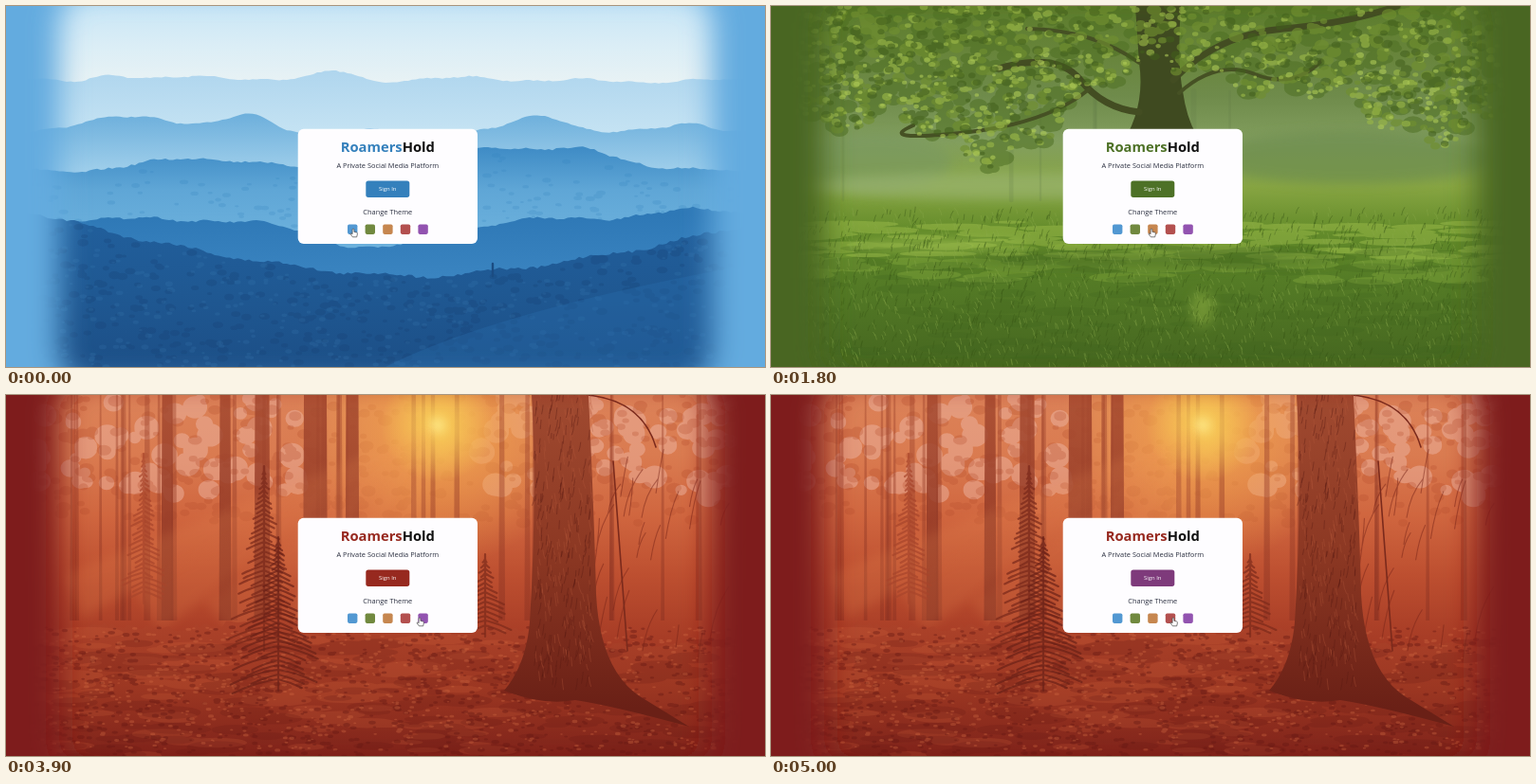
An HTML page for the animation above (5.1 s loop, 800x381 px).

```html
<!DOCTYPE html>
<html lang="en">
<head>
<meta charset="utf-8">
<title>RoamersHold</title>
<style>
  html, body { margin: 0; width: 100%; height: 100%; overflow: hidden; }
  svg { display: block; width: 100%; height: 100%; }
  text { font-family: "Open Sans", "Noto Sans", sans-serif; text-anchor: middle; }
</style>
</head>
<body>
<svg id="stage" viewBox="0 0 800 381">
  <defs id="defs">
    <filter id="soft" x="-20%" y="-20%" width="140%" height="140%"><feGaussianBlur stdDeviation="15"/></filter>
    <filter id="haze" x="-50%" y="-100%" width="200%" height="300%"><feGaussianBlur stdDeviation="6"/></filter>
  </defs>
  <g id="scenes"></g>
  <rect x="307.7" y="129.7" width="189.3" height="121.3" rx="6" fill="#fefdff"/>
  <text x="402.3" y="153.8" font-size="14.75" font-weight="700" fill="#111"><tspan id="brand">Roamers</tspan>Hold</text>
  <text x="402.3" y="171" font-size="7.43" fill="#2b3040">A Private Social Media Platform</text>
  <rect id="button" x="379.3" y="184.5" width="46" height="17.4" rx="2.6"/>
  <text x="402.3" y="195.3" font-size="5.9" fill="#fff">Sign In</text>
  <text x="402.3" y="220.2" font-size="7.43" fill="#2b3040">Change Theme</text>
  <g id="swatches"></g>
  <g id="cursor" stroke="#444" stroke-width=".7" stroke-linejoin="round" fill="#fff">
    <path id="hand" d="M-.9 .6Q0 -.6 .9 .6V3.3L3.6 4Q4.6 4.3 4.4 5.6L3.7 8.8H-.6L-2.8 5.9Q-3 4.8-2 4.9L-.9 5.7Z"/>
    <path id="arrow" d="M0 0V8.6L2 6.9L3.4 10L4.9 9.3L3.6 6.3H6.2Z"/>
  </g>
</svg>
<script>
const LOOP = 5100, STEP = 100, FADE = 300;
const $ = id => document.getElementById(id);

const themes = [
  { draw: hills, swatch: '#5298d2', main: '#3480bc', edge: '#64abdf' },
  { draw: tree, swatch: '#71893f', main: '#4d7126', edge: '#4a6622' },
  { draw: desert, swatch: '#c6864f', main: '#b2693c', edge: '#a4623d' },
  { draw: forest, swatch: '#b3504f', main: '#97291f', edge: '#7e1c1b' },
  { draw: lake, swatch: '#9253b0', main: '#76409a', edge: '#5f2b79' }
];

// Each visit: pointer leaves, arrives, at x, then picks a theme
const visits = [
  { from: 200, to: 700, x: 385.5, pick: 960, theme: 1 },
  { from: 1300, to: 1700, x: 401, pick: 1960, theme: 2 },
  { from: 2400, to: 2800, x: 421, pick: 3160, theme: 3 },
  { from: 3600, to: 3800, x: 436, pick: 3960, theme: 4 },
  { from: 4400, to: 4800, x: 424, pick: 4960, theme: 3 }
];

let seed = 7;
const rnd = (a = 0, b = 1) => {
  seed = (seed * 16807) % 2147483647;
  return a + (b - a) * seed / 2147483647;
};
const n1 = v => v.toFixed(1);
const clamp = v => Math.max(0, Math.min(1, v));
const many = (n, make) => Array.from({ length: n }, (_, i) => make(i)).join('');

// Ground line: a level with bell-shaped hills [x, height, width] and a gentle wave
const land = (level, ...bells) => x => level + 2 * Math.sin(x / 23 + level) + Math.sin(x / 9) -
  bells.reduce((sum, [c, h, w]) => sum + h * Math.exp(-(((x - c) / w) ** 2)), 0);

const path = (d, fill, more = '') => `<path d="${d}" fill="${fill}" ${more}/>`;
const line = (d, color, w, op = 1) =>
  `<path d="${d}" fill="none" stroke="${color}" stroke-width="${w}" stroke-linecap="round" opacity="${op}"/>`;
const box = (y, h, fill) => `<rect y="${y}" width="800" height="${h}" fill="${fill}"/>`;
const glow = (x, y, rx, ry, fill, op = .6) =>
  `<ellipse cx="${x}" cy="${y}" rx="${rx}" ry="${ry}" fill="${fill}" opacity="${op}" filter="url(#haze)"/>`;

let ids = 0;
function define(tag, attrs, stops) {
  const id = 'g' + ids++;
  $('defs').insertAdjacentHTML('beforeend',
    `<${tag} id="${id}" gradientUnits="userSpaceOnUse" ${attrs}>${stops}</${tag}>`);
  return `url(#${id})`;
}
const grad = (y0, y1, ...colors) => define('linearGradient', `x1="0" x2="0" y1="${y0}" y2="${y1}"`,
  colors.map((c, i) => `<stop offset="${i / (colors.length - 1)}" stop-color="${c}"/>`).join(''));
const radial = (x, y, r, color) => `<circle cx="${x}" cy="${y}" r="${r}" fill="${
  define('radialGradient', `cx="${x}" cy="${y}" r="${r}"`,
    `<stop offset="0" stop-color="${color}"/><stop offset="1" stop-color="${color}" stop-opacity="0"/>`)}"/>`;

function ridge(top, fill, rough = 1, x0 = 0, x1 = 800) {
  let d = `M${x0} 381`;
  for (let x = x0; x <= x1; x += 4) d += `L${x} ${n1(top(x) + rnd(-rough, rough))}`;
  return path(d + 'V381Z', fill);
}

// Many small ovals in one path, kept where ok(x, y) holds
const dots = (n, y0, y1, r, flat, fill, op, ok = () => true) => path(many(n, () => {
  const x = rnd(25, 775), y = rnd(y0, y1), a = r * rnd(.4, 1), b = a * flat;
  return ok(x, y) ? `M${n1(x - a)} ${n1(y)}a${n1(a)} ${n1(b)} 0 1 0 ${n1(2 * a)} 0a${n1(a)} ${n1(b)} 0 1 0 ${n1(-2 * a)} 0` : '';
}), fill, `opacity="${op}"`);

// Many short bent strokes leaning by (dx, dy)
const blades = (n, y0, y1, dx, dy, color, w, op, ok = () => true) => line('M0 0' + many(n, () => {
  const x = rnd(25, 775), y = rnd(y0, y1), k = rnd(.4, 1);
  return ok(x, y) ? `M${n1(x)} ${n1(y)}q${n1(dx * k * .2)} ${n1(dy * k * .6)} ${n1(dx * k * rnd(.2, 1))} ${n1(dy * k)}` : '';
}), color, w, op);

function hills() {
  const mid = land(174, [210, 14, 80], [510, 25, 55], [610, 22, 60]);
  const front = x => 285 - 75 * (Math.abs(x - 430) / 430) ** 1.6 + 2 * Math.sin(x / 17);
  const low = (x, y) => y > front(x) + 4;
  return box(0, 381, grad(0, 90, '#c9e6f6', '#dceef6', '#ebf3f4')) +
    ridge(land(79, [350, 11, 28], [110, 8, 25], [220, 5, 50], [500, 4, 40]), grad(70, 135, '#b0d6ee', '#c5e3f3'), .6) +
    ridge(land(132, [140, 15, 75], [255, 15, 32], [565, 15, 40], [725, 8, 30]), grad(115, 172, '#6eb0dc', '#9dcdea'), .6) +
    ridge(mid, grad(148, 240, '#3e8bc5', '#5fa6d6', '#6bb0dc')) +
    dots(250, 155, 240, 5, .5, '#2f7dba', .2, (x, y) => y > mid(x) + 6) +
    ridge(land(225, [390, -30, 90], [740, 10, 80]), grad(220, 285, '#2e78b6', '#3a84c0')) +
    ridge(front, grad(225, 381, '#215f9c', '#1f5892', '#1c4f87'), 1.5) +
    dots(650, 215, 381, 6, .6, '#173f70', .25, low) + dots(500, 215, 381, 4, .6, '#3c7fb5', .18, low) +
    path('M400 381Q520 320 800 270V381Z', '#2a6dac', 'opacity=".35"') + line('M513 285V272', '#1b4c82', 2.4);
}

function tree() {
  const rim = land(62, [235, -108, 95], [700, -85, 100], [60, -65, 80], [520, -30, 60]);
  const leaf = (x, y) => y < rim(x) + 10 * Math.sin(x / 11) - 4;
  const crown = (n, r, color, op, y0 = 0) => dots(n, y0, 185, r, .7, color, op, leaf);
  let s = box(0, 381, grad(0, 381, '#5c7c2c', '#67843a', '#6f8b4b', '#829e5e', '#87a542', '#638b2a', '#557c26', '#4d7123', '#45661f'));
  s += glow(610, 160, 150, 28, '#6b8a4d') + glow(110, 165, 80, 30, '#799860') + glow(250, 190, 220, 14, '#9bb576');
  s += many(9, () => line(`M${n1(rnd(60, 750))} 205V90`, '#5e7a45', rnd(2, 6), .2));
  s += crown(650, 13, '#4f7023', .55);
  s += path('M376 135Q394 100 388 60L384 0H432Q428 60 434 90Q438 118 448 135Z', '#3f4a20');
  s += line('M388 112Q350 108 326 78T240 66M424 78Q470 30 540 24T660 0', '#434d22', 7) +
    line('M335 88Q290 125 200 134T150 126M430 92Q470 56 510 72T580 58M388 60Q340 25 270 24', '#465124', 4);
  s += crown(650, 8, '#718f30', .65) + crown(650, 5, '#98b648', .65) + crown(400, 4, '#b0cb58', .6, 50) + crown(550, 6, '#42601c', .55);
  // Sunlit streaks above, tree shade below
  s += dots(110, 228, 265, 42, .09, '#a8c650', .4) + dots(70, 252, 290, 38, .14, '#9cbf48', .28) +
    dots(120, 250, 381, 40, .13, '#3c601b', .22);
  s += glow(180, 252, 95, 6, '#a9c852', .6) + glow(455, 320, 12, 18, '#94b544', .5) + glow(400, 268, 200, 9, '#476b20', .5);
  return s + blades(1500, 218, 388, 4, -8, '#3a5a18', .9, .5) + blades(1200, 218, 388, -4, -7, '#8cab4c', .8, .45);
}

function desert() {
  let s = box(0, 381, grad(0, 110, '#cfa848', '#deb052', '#d08a45')) + radial(408, 40, 300, '#f4ec72') +
    radial(408, 60, 70, '#fff8a8') + glow(408, 62, 16, 8, '#fffbd0', .9) +
    '<ellipse cx="408" cy="62" rx="10" ry="5.5" fill="#fffff4"/>' +
    line('M375 50H432M384 40H422M395 46H440', '#fff3a0', 1.2, .7);
  s += ridge(land(79, [160, 5, 60], [580, 6, 100], [0, -15, 70], [800, -10, 70]), grad(72, 135, '#d08a44', '#d58a45', '#b9643a'), .6);
  s += box(106, 34, grad(106, 140, '#c77a40', '#b2623a', '#a8603a'));
  s += dots(250, 128, 141, 6, .45, '#7e4a30', .6) + dots(160, 112, 128, 9, .2, '#974f34', .35);
  s += box(139, 242, grad(139, 381, '#c98846', '#d29c48', '#cf9a46', '#c79040', '#bd853c'));
  // Dune crests grow larger towards the viewer
  for (let y = 148; y < 385; y += 3 + (y - 140) * .045) {
    const size = 1 + (y - 140) / 45;
    let lit = '', dark = '';
    for (let x = rnd(-80, 0); x < 800;) {
      const w = rnd(22, 42) * (1 + size * .3), h = rnd(1.2, 2.8) * size, v = y + rnd(-2, 2) * size;
      lit += `M${n1(x)} ${n1(v)}q${n1(w * .35)} ${n1(-h * 1.4)} ${n1(w)} ${n1(h * .3)}q${n1(-w * .5)} ${n1(h * .5)} ${n1(-w)} ${n1(-h * .3)}`;
      dark += `M${n1(x + w * .3)} ${n1(v - h * .5)}q${n1(w * .5)} 0 ${n1(w)} ${n1(h * 1.7)}q${n1(-w * .6)} ${n1(h * .3)} ${n1(-w)} ${n1(-h * 1.7)}`;
      x += w * rnd(.8, 1.3);
    }
    s += path(dark, '#a86e2c', 'opacity=".45"') + path(lit, '#e5bb66', 'opacity=".6"');
  }
  return s + dots(55, 230, 370, 4, .5, '#96672f', .65);
}

function fir(x, top, base, w, color) {
  let d = `M${x} ${top}V${base}`;
  for (let y = top + 8; y < base - 8; y += 5) {
    const r = w * (y - top) / (base - top), a = r * rnd(.4, 1), b = r * rnd(.4, 1);
    d += `M${n1(x - a)} ${n1(y + a * .25)}Q${n1(x - a / 2)} ${y} ${x} ${y - 3}Q${n1(x + b / 2)} ${y} ${n1(x + b)} ${n1(y + b * .25)}`;
  }
  return line(d, color, 2.2, .7);
}

function forest() {
  const post = (x, w, op) => path(`M${n1(x - w / 2)} 0h${n1(w)}l1 238h${n1(-w - 2)}Z`, grad(0, 238, '#a5492f', '#872f20'), `opacity="${op}"`);
  let s = box(0, 381, grad(0, 381, '#dc8258', '#da7b50', '#d0663f', '#bd4f30', '#a83d26', '#97301f', '#81241a'));
  s += dots(170, 0, 110, 14, .9, '#eeb3a2', .5, x => x < 310 || x > 500) + dots(420, 0, 135, 8, .7, '#b54c2e', .28);
  s += radial(455, 32, 150, '#f2a44c');
  s += many(32, () => post(rnd(60, 760), rnd(1.5, 5), .45));
  s += [[170, 11], [231, 11], [270, 15], [326, 24], [365, 13]].map(([x, w]) => post(x, w, .85)).join('');
  s += radial(455, 32, 60, '#f8cf58') + glow(455, 32, 7, 7, '#fff0a0', .8);
  // Sunbeams
  s += many(5, i => path(`M452 34L${60 + i * 75} ${190 + i * 14}l${20 + i * 8} 45Z`, '#f39a5c', 'opacity=".16" filter="url(#haze)"'));
  s += ridge(land(245, [360, 12, 110], [680, -20, 120]), grad(235, 381, '#ad432a', '#9c3722', '#7f231a'), 3);
  s += dots(130, 245, 381, 38, .16, '#d0643e', .2, x => x < 530) + dots(170, 260, 381, 34, .2, '#641812', .22);
  s += dots(900, 245, 385, 4, .5, '#641812', .4) + dots(800, 245, 375, 3, .5, '#d06a43', .35);
  s += fir(145, 62, 220, 28, '#a8452c') + fir(272, 75, 270, 44, '#79291b') + fir(287, 150, 312, 62, '#6b2117') +
    fir(505, 168, 255, 38, '#7d2a1b');
  s += blades(110, 60, 290, 24, -55, '#792419', 1.1, .5, x => x > 615) + line('M612 0Q670 5 685 55M655 270L640 70', '#7b2a1c', 1.6);
  s += path('M554 0H614Q620 130 622 210Q626 290 668 318L720 350Q640 328 600 322Q565 328 525 312Q548 285 552 240Q560 110 554 0Z',
    grad(0, 330, '#a04a30', '#8c3823', '#6a2016'));
  const bark = x => x > 557 && x < 617;
  return s + blades(2400, -10, 300, 4, 14, '#b2583a', 1, .35, bark) + blades(2400, -10, 300, -3, 12, '#571a12', 1, .4, bark);
}

function lake() {
  const left = x => 142 + 8 * Math.sin(x / 30) + 125 * clamp((x - 290) / 145) ** 1.3;
  const right = x => 262 - 215 * clamp((x - 495) / 300) ** .6;
  const inL = (x, y) => x < 435 && y > left(x) && x < 440 - (y - 265) * .5;
  const inR = (x, y) => x > 495 && y > right(x) && x > 495 + (y - 265) * .25;
  const field = (x, y) => inL(x, y) || inR(x, y);
  const peaks = land(101, [215, 41, 55], [503, 32, 42], [575, 12, 45]);
  let s = box(0, 110, grad(0, 110, '#9c66b6', '#b480c8', '#c890ca', '#d69ab4')) + glow(600, 88, 120, 12, '#e9a45c', .8) +
    glow(390, 94, 100, 8, '#eba35a', .8) + glow(650, 50, 110, 9, '#d883a4') + glow(690, 22, 90, 14, '#7f4aa0', .5) +
    glow(130, 45, 90, 20, '#bf92d4') + line('M330 20Q470 38 640 10M420 48Q560 45 720 30', '#8e5aac', 2.5, .4);
  s += ridge(peaks, grad(58, 110, '#5b2c66', '#623279', '#54286e'), .4, 40, 672);
  s += path('M625 110Q680 92 740 74L800 64V112Z', '#4d2358');
  s += box(108, 120, grad(108, 228, '#9468b4', '#b791cf', '#a583c4', '#9a78bc')) + glow(570, 126, 90, 9, '#dc9a80', .8) +
    glow(540, 158, 60, 18, '#e0a67a') + glow(520, 195, 30, 15, '#d0a0a8', .5);
  s += blades(130, 110, 165, 24, 0, '#8657a6', .8, .4) + path('M40 110L80 112L60 119H0V110Z', '#4f2560');
  s += box(226, 155, '#552772');
  s += path('M436 266H497L502 300L528 381H375Q400 345 418 315Z', grad(262, 381, '#9b7bb0', '#9a79ae', '#85609d'));
  const trail = (x, y) => x > 400 && x < 520;
  s += dots(500, 270, 381, 9, .4, '#6b4587', .35, trail) + dots(300, 270, 381, 7, .4, '#bfa3cc', .4, trail) +
    line('M434 307V315M436 322V327', '#50255f', 3);
  const fill = grad(100, 381, '#793f92', '#713a8c', '#5c2a77', '#4f2269');
  s += ridge(left, fill, 4, 0, 380) + path('M378 381V205L436 268Q425 320 380 381Z', fill) +
    ridge(right, fill, 4, 528, 800) + path('M530 381L496 262L530 200Z', fill);
  s += dots(800, 60, 381, 6, .7, '#441a5c', .45, field) + dots(600, 60, 381, 4, .7, '#9a5bb0', .45, field);
  s += blades(600, 110, 381, 13, -26, '#a866be', 2, .55, inL) + blades(800, 70, 381, -15, -25, '#ac6cc0', 2, .55, inR);
  s += blades(260, 60, 381, 8, -15, '#c38ad0', 1.1, .5, field);
  return s + glow(290, 330, 55, 32, '#421a5c') + glow(520, 345, 14, 40, '#4a1f64', .4);
}

const frame = c => path('M-90 -90H890V471H-90ZM96 -18Q56 -18 56 22V359Q56 399 96 399H704Q744 399 744 359V22Q744 -18 704 -18Z',
  c, 'fill-rule="evenodd" filter="url(#soft)"');

$('scenes').innerHTML = themes.map(t => `<g>${t.draw()}${frame(t.edge)}</g>`).join('');
const scenes = [...$('scenes').children];

const SIZE = 10.4;
const swatchX = i => 360 + i * 18.6;
$('swatches').innerHTML = themes.map((t, i) =>
  `<rect x="${swatchX(i)}" y="230.5" width="${SIZE}" height="${SIZE}" rx="1.8" fill="${t.swatch}"/>`).join('');

const ease = k => 1 - (1 - clamp(k)) ** 2;
function mix(a, b, k) {
  const part = (c, i) => parseInt(c.slice(i, i + 2), 16);
  return `rgb(${[1, 3, 5].map(i => Math.round(part(a, i) + (part(b, i) - part(a, i)) * k))})`;
}

let shown = -1;
function render(ms) {
  const t = Math.floor((ms % LOOP) / STEP) * STEP;
  if (t === shown) return;
  shown = t;

  let x = 366, now = 0, color = themes[0].main;
  for (const v of visits) {
    x += (v.x - x) * ease((t - v.from) / (v.to - v.from));
    if (t < v.pick) continue;
    color = mix(themes[now].main, themes[v.theme].main, ease((t - v.pick) / FADE));
    now = v.theme;
  }
  scenes.forEach((g, n) => g.setAttribute('display', n === now ? 'inline' : 'none'));
  $('brand').setAttribute('fill', themes[now].main);
  $('button').setAttribute('fill', color);

  const over = themes.some((_, n) => x >= swatchX(n) && x <= swatchX(n) + SIZE);
  $('cursor').setAttribute('transform', `translate(${n1(x)} 235)`);
  $('hand').setAttribute('display', over ? 'inline' : 'none');
  $('arrow').setAttribute('display', over ? 'none' : 'inline');
}

const start = performance.now();
function tick() {
  render(performance.now() - start);
  requestAnimationFrame(tick);
}
render(0);
requestAnimationFrame(tick);
</script>
</body>
</html>
```
